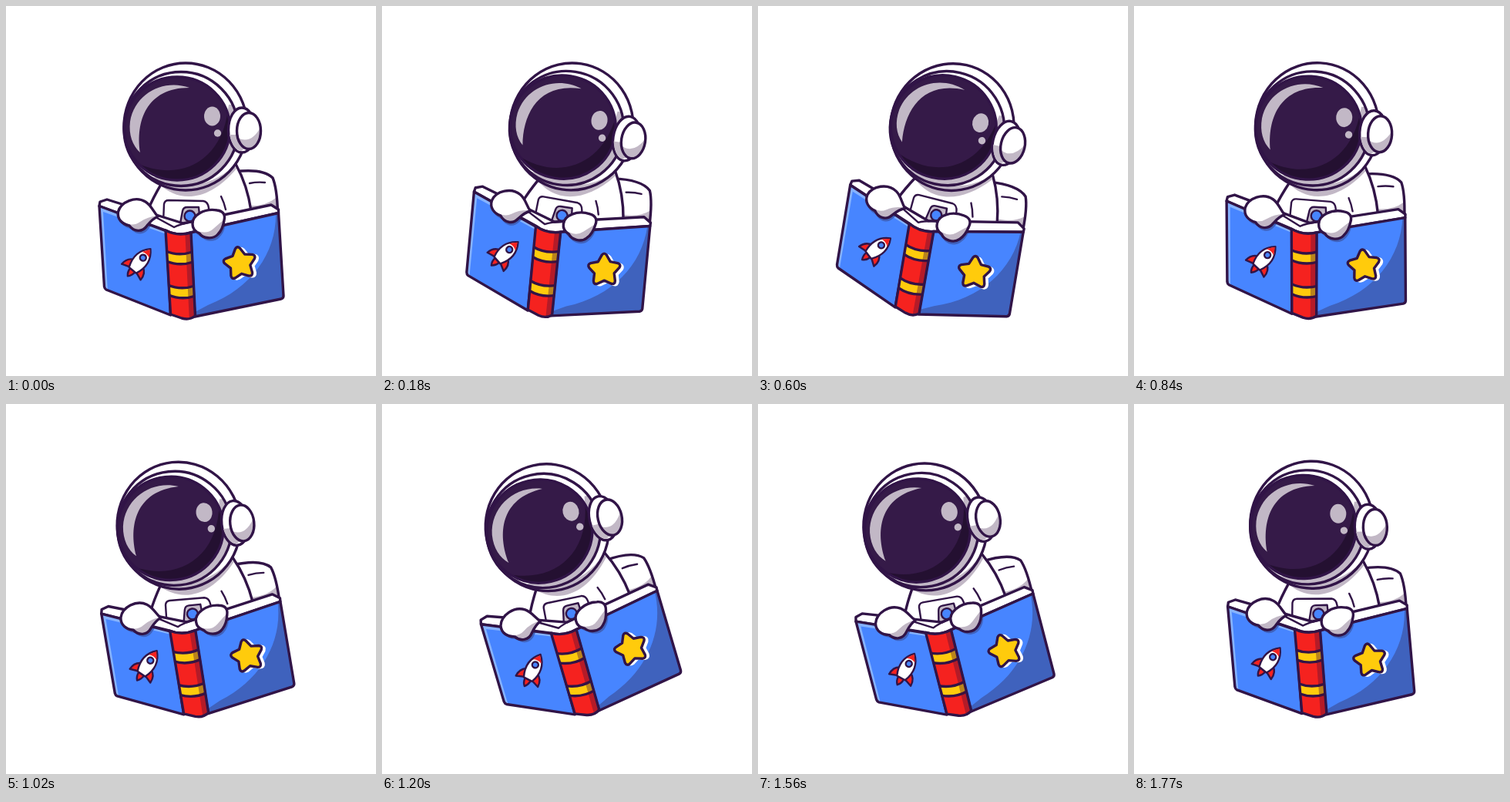
Recreate the animation shown at these times as an HTML page. Size 480 by 480 pixels, loop 1800 ms.

```html
<!DOCTYPE html>
<html lang="en">
<head>
<meta charset="utf-8">
<title>Astronaut reading</title>
<style>
  html, body { margin: 0; width: 100%; height: 100%; overflow: hidden; background: #fff; }
  svg { display: block; width: 100vw; height: 100vh; }
  .line { stroke: #311447; stroke-width: 3.4; stroke-linejoin: round; stroke-linecap: round; }
  .thin { stroke-width: 2.4; }
  .none { fill: none; }
  .white { fill: #fff; }
  .gray { fill: #c2b8c6; }
  .blue { fill: #4785ff; }
  .navy { fill: #3f62bd; }
  .sky { fill: #86b3ff; }
  .red { fill: #f5221f; }
  .gold { fill: #ffcb0c; }
  .visor { fill: #351a48; }
  .night { fill: #241031; }
  .shade { fill: #4b1038; opacity: .38; }
</style>
</head>
<body>
<svg viewBox="0 0 480 480">
  <defs>
    <ellipse id="helmet" cx="233" cy="156.500" rx="80" ry="82.500"/>
    <ellipse id="rim" cx="227" cy="159.500" rx="74" ry="74"/>
    <ellipse id="glass" cx="222" cy="159" rx="68.500" ry="67"/>
    <ellipse id="ear" cx="315" cy="162" rx="15.500" ry="23.500"/>
    <path id="torso" d="M203 228C196 240 190 250 185 263L190 292L310 282L318 266C315 245 309 225 298 205Z"/>
    <path id="pack" d="M296 215C320 212 338 215 346 223C351 235 352 250 352.500 268L314 272C314 248 308 230 296 215Z"/>
    <path id="left" d="M121 259.500L208 292L213.500 401L130 368Q128 367 127.500 364Z"/>
    <path id="right" d="M239.500 294L353.500 268.500L360 376Q360 379 357 380L245 403Z"/>
    <path id="spine" d="M207 291Q222 299 240 294L245.500 402Q238 408 228 405L213.500 400Z"/>
    <path id="handL" d="M145.500 267C149 254 168 246 181 254C189 259 191 267 197 273C190 276 187 280 183 285C177 294 166 293 160 285C151 283 144 277 145.500 267Z"/>
    <path id="handR" d="M242 283C241 272 257 262 274 265C281 266 285 270 283 278C282 285 280 291 275 296C268 304 255 301 251 295C246 293 242 289 242 283Z"/>
  </defs>

  <g id="figure">
    <g data-shape="pack" data-fill="white">
      <path class="gray" d="M310 259Q336 261 350 249L358 275H310Z"/>
    </g>
    <path class="line none thin" d="M316 230Q326 228 336 229"/>
    <g data-shape="torso" data-fill="white">
      <path class="gray" d="M198 230C225 257 264 253 299 211L280 190H210Z"/>
    </g>
    <path class="line none thin" d="M279 247Q283 255 285 264"/>
    <path class="line white thin" d="M204 281L205 257Q206 252 211 252L256 253Q262 254 263 262L264 282Z"/>
    <path class="line gray thin" d="M226 282L229 266Q230 261 235 261H250L252 282Z"/>
    <circle class="line blue thin" cx="238.500" cy="272.500" r="7"/>

    <g data-shape="helmet" data-fill="gray">
      <ellipse class="white" cx="236" cy="149" rx="83" ry="83"/>
    </g>
    <g data-shape="rim" data-fill="white">
      <path class="gray" d="M165 222Q275 230 289 128L320 128V250H165Z"/>
    </g>
    <g data-shape="glass" data-fill="visor">
      <path class="night" d="M168 203C225 230 280 202 288 134L310 130V240H165Z"/>
    </g>
    <path class="gray" d="M238 106C205 94 167 113 161 150C159 167 164 181 174 190C168 150 182 106 238 106Z"/>
    <ellipse class="gray" cx="267.500" cy="143" rx="10.500" ry="12.500"/>
    <circle class="gray" cx="274.500" cy="165" r="4.700"/>

    <ellipse class="line white" cx="306" cy="161" rx="17.500" ry="29"/>
    <path class="gray" d="M290 167Q294 186 305 188L311 184Q302 178 300 167Z"/>
    <g data-shape="ear" data-fill="white">
      <path class="gray" d="M296 168Q317 184 332 154V192H296Z"/>
    </g>

    <path class="line white" d="M121 259.500L122 254L131 251L230 282L344 258L353.500 264V268.500L239.500 294Q222 299 207 291Z"/>
    <path class="line none thin" d="M196 275L218 287Q225 283 241 280"/>
    <g data-shape="left" data-fill="blue">
      <path class="sky" d="M121 259L208 292V296L126 267L132 370L126 367Z"/>
      <use href="#handL" class="navy" x="2" y="4"/>
    </g>
    <g data-shape="right" data-fill="blue">
      <path class="navy" d="M350 266C352 318 320 366 262 388L245 397V408L366 386V260Z"/>
      <use href="#handR" class="navy" x="2" y="4"/>
    </g>
    <g data-shape="spine" data-fill="red">
      <g id="bands"></g>
      <path class="shade" d="M232 288H250V410H238Z"/>
    </g>

    <g data-shape="handL" data-fill="white">
      <path class="gray" d="M148 278Q163 288 174 280T202 272L190 296H145Z"/>
    </g>
    <g data-shape="handR" data-fill="white">
      <path class="gray" d="M240 287Q258 299 269 289T290 271V305H240Z"/>
    </g>

    <g transform="translate(172 333.500) rotate(40)">
      <path class="line red thin" d="M-4 12Q-4 18 0 22Q4 18 4 12Z"/>
      <path class="line red thin" d="M-7 0Q-16 4 -16 15L-5 11ZM7 0Q16 4 16 15L5 11Z"/>
      <path class="line white thin" d="M0 -24Q-15 -9 -6 12H6Q15 -9 0 -24Z"/>
      <path class="red" d="M0 -23Q-4 -18 -6 -14Q0 -17 6 -14Q4 -18 0 -23Z"/>
      <circle class="line blue thin" cx="0" cy="-9" r="4"/>
    </g>

    <path id="sticker" class="white" stroke="#fff" stroke-width="5" stroke-linejoin="round"/>
    <path id="star" class="line gold"/>
  </g>
</svg>
<script>
  const LOOP = 1800, STEP = 30, SWAY = 15;
  const svg = document.querySelector("svg");
  const byId = id => document.getElementById(id);

  // Fill a shape, clip its shading to it, then outline it.
  for (const group of svg.querySelectorAll("[data-shape]")) {
    const { shape, fill } = group.dataset;
    const use = cls => `<use href="#${shape}" class="${cls}"/>`;
    group.innerHTML = `<clipPath id="clip-${shape}">${use("")}</clipPath>${use(fill)}
      <g clip-path="url(#clip-${shape})">${group.innerHTML}</g>${use("line none")}`;
  }

  const band = (x, y) =>
    `<path class="line gold" d="M${x} ${y}q17 7 35 1l1 13q-18 6 -35 -1z"/>`;
  byId("bands").innerHTML = band(207, 318) + band(210, 362);

  // Five-pointed star with softened tips.
  function starPath(cx, cy, radius, tilt) {
    const at = (r, deg) => {
      const a = (deg + tilt - 90) * Math.PI / 180;
      return `${(cx + r * Math.cos(a)).toFixed(2)} ${(cy + r * Math.sin(a)).toFixed(2)}`;
    };
    let d = "";
    for (let i = 0; i < 5; i++) {
      const a = i * 72;
      d += `${i ? "L" : "M"}${at(radius * .88, a - 9)}Q${at(radius * 1.04, a)} ${at(radius * .88, a + 9)}L${at(radius * .6, a + 36)}`;
    }
    return d + "Z";
  }
  byId("star").setAttribute("d", starPath(303.5, 334, 22.5, -9));
  byId("sticker").setAttribute("d", starPath(307.5, 335, 21, -9));

  const figure = byId("figure");
  function draw(time) {
    const t = Math.floor(time % LOOP / STEP) * STEP;
    const angle = SWAY * Math.sin(2 * Math.PI * t / LOOP);
    figure.setAttribute("transform", `rotate(${angle.toFixed(3)} 240 240)`);
  }

  const start = performance.now();
  function tick() {
    draw(performance.now() - start);
    requestAnimationFrame(tick);
  }
  draw(0);
  requestAnimationFrame(tick);
</script>
</body>
</html>
```
